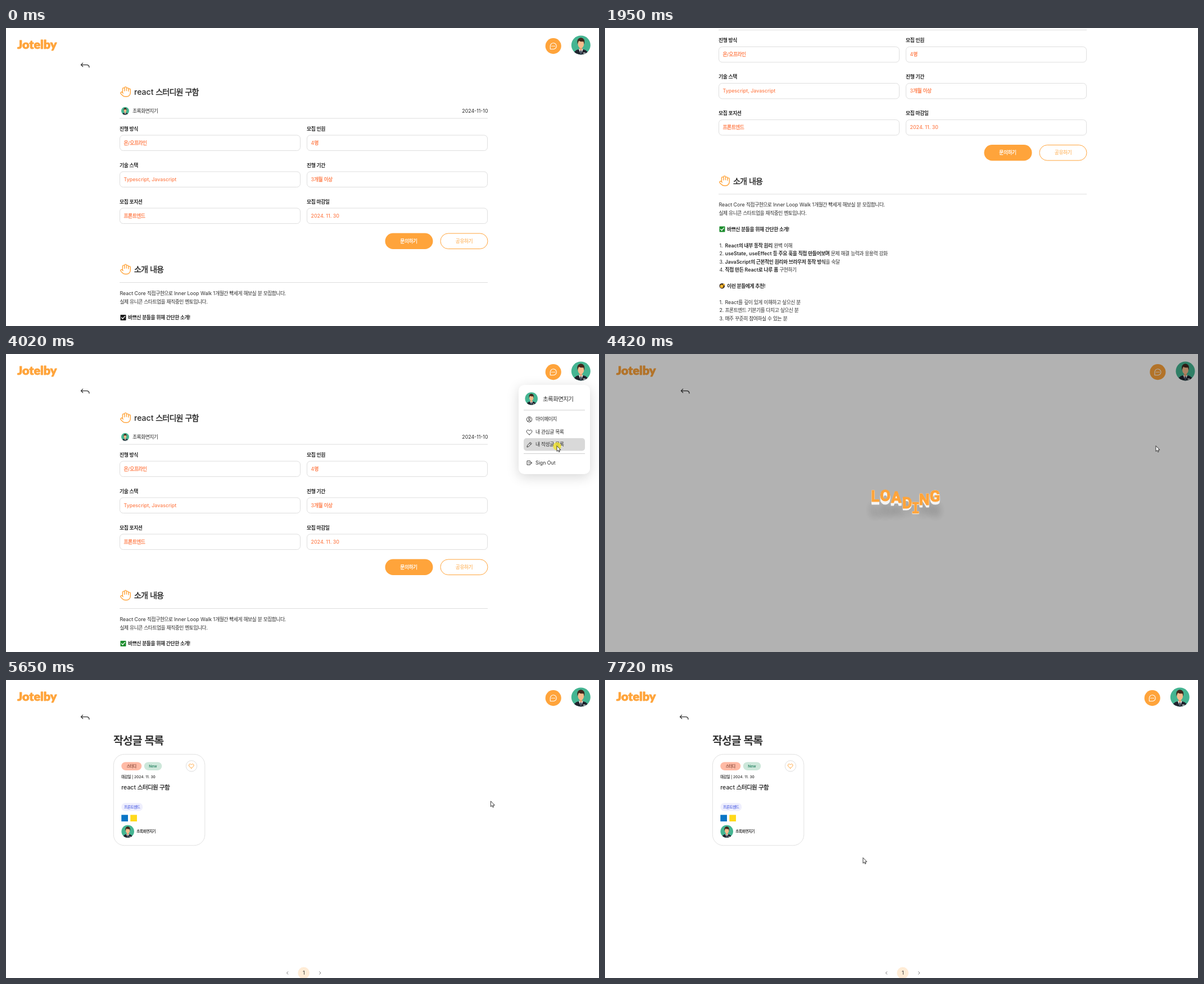
These frames come from a looping animation (1055 px wide and 531 px high, 7.98 s). An HTML page with a canvas:

```html
<!DOCTYPE html>
<html lang="ko">
<head>
<meta charset="utf-8">
<title>Study board</title>
<style>
html, body { margin: 0; width: 100%; height: 100%; overflow: hidden; background: #fff; }
canvas { display: block; width: 1055px; height: 531px; }
</style>
</head>
<body>
<canvas id="stage"></canvas>
<script>
const W = 1055, H = 531, LOOP = 7980;
const canvas = document.getElementById('stage');
const c = canvas.getContext('2d');
const dpr = window.devicePixelRatio || 1;
canvas.width = W * dpr;
canvas.height = H * dpr;

const FONT = 'Inter, "Noto Sans CJK KR", "Noto Sans CJK", sans-serif';
const ORANGE = '#ffa43b', CORAL = '#ff7f4d', INK = '#2b2b2b', LINE = '#dedede';
const NICK = '초록화면지기';

// Screen updates: start, end, number of steps
const BURSTS = [
  [870, 1290, 7], [1950, 2300, 6], [2630, 3120, 8], [3320, 3740, 7], [3940, 4700, 12],
  [4760, 5450, 11], [5650, 6420, 12], [6490, 7230, 12], [7300, 7720, 7]
];
// Pointer moves: start, end, points
const MOVES = [
  [2560, 2840, [[1044, 100], [1030, 55], [1020, 20]]],
  [3250, 3740, [[1020, 20], [1006, 70], [986, 125], [980, 164]]],
  [5580, 6420, [[980, 164], [640, 300], [300, 334], [140, 240], [200, 125], [290, 114]]],
  [6420, 7230, [[290, 114], [375, 150], [387, 240], [300, 310], [175, 230], [230, 112], [363, 124]]],
  [7230, 7720, [[363, 124], [400, 200], [440, 280], [459, 317]]]
];
const MENU_ON = 2980, LOAD_ON = 4140, LIST_ON = 5445;
const SCROLL = 190, STICKY = 83.2;

const clamp = v => Math.min(1, Math.max(0, v));
const span = (t, a, b) => clamp((t - a) / (b - a));

function snap(t) {
  let q = 0;
  for (const [a, b, n] of BURSTS) {
    if (t < a) break;
    const step = (b - a) / (n - 1);
    q = Math.min(b, a + Math.floor((t - a + 5) / step) * step);
  }
  return q;
}

function scrollAt(t) {
  if (t < 1900) return SCROLL * (1 - Math.pow(1 - span(t, 800, 1290), 1.21));
  return SCROLL * Math.pow(1 - span(t, 1880, 2300), 1.03);
}

function spline(pts, p) {
  const n = pts.length - 1, i = Math.min(n - 1, Math.floor(p * n)), u = p * n - i;
  const at = k => pts[Math.min(n, Math.max(0, k))];
  return [0, 1].map(d => {
    const a = at(i - 1)[d], b = at(i)[d], e = at(i + 1)[d], f = at(i + 2)[d];
    return b + u / 2 * (e - a + u * (2 * a - 5 * b + 4 * e - f + u * (3 * (b - e) + f - a)));
  });
}

function pointerAt(t) {
  const m = MOVES.filter(v => v[0] < t).pop();
  return spline(m[2], span(t, m[0], m[1]));
}

// CSS "ease" timing curve
function ease(x) {
  const bez = (s, a, b) => 3 * (1 - s) * (1 - s) * s * a + 3 * (1 - s) * s * s * b + s * s * s;
  let lo = 0, hi = 1;
  for (let i = 0; i < 16; i++) {
    const m = (lo + hi) / 2;
    if (bez(m, .25, .25) < x) lo = m; else hi = m;
  }
  return bez(lo, .1, 1);
}

// Draws a line centred on y and returns its end x.
// Hangul is set tighter, and its medium weight is made with a thin outline.
function text(s, x, y, size = 8.8, weight = 400, color = INK, align = 'left') {
  c.font = `${weight} ${size}px ${FONT}`;
  c.fillStyle = c.strokeStyle = color;
  c.lineWidth = size * .03;
  const runs = s.split(/([가-힣]+)/).filter(Boolean).map(word => {
    const hangul = /[가-힣]/.test(word);
    const gap = hangul ? (weight > 500 ? -.05 : -.06) * size + 'px' : '0px';
    c.letterSpacing = gap;
    return { word, hangul, gap, width: c.measureText(word).width };
  });
  const total = runs.reduce((w, r) => w + r.width, 0);
  if (align === 'center') x -= total / 2;
  if (align === 'right') x -= total;
  for (const r of runs) {
    c.letterSpacing = r.gap;
    c.fillText(r.word, x, y + size * .37);
    if (r.hangul && weight === 500) c.strokeText(r.word, x, y + size * .37);
    x += r.width;
  }
  c.letterSpacing = '0px';
  return x;
}

function box(x, y, w, h, r, fill, stroke) {
  c.beginPath();
  c.roundRect(x, y, w, h, r);
  if (fill) { c.fillStyle = fill; c.fill(); }
  if (stroke) { c.strokeStyle = stroke; c.lineWidth = 1; c.stroke(); }
}

function disc(x, y, r, fill, stroke, lw = 1) {
  c.beginPath();
  c.arc(x, y, r, 0, 7);
  if (fill) { c.fillStyle = fill; c.fill(); }
  if (stroke) { c.strokeStyle = stroke; c.lineWidth = lw; c.stroke(); }
}

function icon(d, x, y, scale, color, lw, fill) {
  c.save();
  c.translate(x, y);
  c.scale(scale, scale);
  c.lineWidth = lw / scale;
  c.lineCap = c.lineJoin = 'round';
  const p = new Path2D(d);
  if (fill) { c.fillStyle = fill; c.fill(p); }
  if (color) { c.strokeStyle = color; c.stroke(p); }
  c.restore();
}

const rule = (x, y, w, color = LINE) => { c.fillStyle = color; c.fillRect(x, y, w, 1); };

const HAND = 'M18 11V6a2 2 0 0 0-4 0M14 10V4a2 2 0 0 0-4 0v2M10 10.5V6a2 2 0 0 0-4 0v8' +
  'M18 8a2 2 0 1 1 4 0v6a8 8 0 0 1-8 8h-2c-2.8 0-4.5-.86-6-2.34l-3.6-3.6a2 2 0 0 1 2.83-2.82L7 15';
const HEART = 'M0 4.2C-3 2-4.8.4-4.8-1.6C-4.8-4.6-1.2-5 0-2.6C1.2-5 4.8-4.6 4.8-1.6C4.8.4 3 2 0 4.2Z';
const POINTER = 'M0 0V10L2.3 7.9L3.9 11.3L5.5 10.6L4 7.3H7Z';

function avatar(x, y, r) {
  const shape = (d, color) => icon(d, 0, 0, 1, null, 1, color);
  c.save();
  disc(x, y, r, '#45b592');
  c.clip();
  c.translate(x, y);
  c.scale(r / 17, r / 17);
  shape('M-13.5 18Q-13 9.5-4 7.5H4Q13 9.5 13.5 18Z', '#20242e');
  shape('M-4 7L0 17L4 7Z', '#f4f4f4');
  shape('M-1.3 9.5H1.3L1.6 17H-1.6Z', '#3c4a5a');
  shape('M-2.4 3H2.4V7.5L0 10L-2.4 7.5Z', '#e5a273');
  c.fillStyle = '#f8bb8c';
  c.beginPath();
  c.ellipse(0, -1.8, 5.4, 7.4, 0, 0, 7);
  c.fill();
  shape('M-6.2-1Q-8-12.5 0-13.2Q8-12.5 6.2-1Q5.2-4 4.6-6.5Q0-5.2-3.6-7.6Q-5-5-6.2-1Z', '#40271c');
  c.fillStyle = '#fff';
  c.fillRect(4, 13.5, 4, 1.3);
  c.restore();
}

function header(up, dx = 0) {
  c.save();
  c.translate(0, -up);
  c.font = '900 21.5px Lato, sans-serif';
  c.fillStyle = c.strokeStyle = ORANGE;
  c.lineWidth = .8;
  c.lineJoin = 'round';
  c.fillText('Jotelby', 20, 37);
  c.strokeText('Jotelby', 20, 37);
  const x = 973.7 + dx;
  disc(x, 32.1, 14.1, ORANGE);
  icon('M-5.4 5.4V0A5.5 5.5 0 1 1 0 5.5Z', x, 32.2, 1, '#fff', 1.1);
  for (const d of [-2.5, 0, 2.5]) disc(x + d, 32.4, .8, '#fff');
  avatar(1022.8 + dx, 30.4, 17);
  icon('M3.5-3.2L.2 0L3.5 3.2M.2 0H10Q14.8 0 14.8 4.5', 133.2 + dx * .2, 65.6, 1, '#333', 1.3);
  c.restore();
}

function field(label, value, x, y) {
  text(label, x, y - 11, 8.8, 600);
  box(x + .5, y + .5, 321, 27.5, 6, '#fff', LINE);
  text(value, x + 7.5, y + 14, 8.8, 500, CORAL);
}

function section(title, y) {
  icon(HAND, 202.2, y - 10.6, .87, ORANGE, 1.4);
  text(title, 228, y, 14.08, 500);
}

function post(scroll, tick) {
  c.save();
  c.translate(0, -scroll);
  section('react 스터디원 구함', 113.7);
  avatar(212, 147.8, 7);
  text(NICK, 225, 147.5);
  text('2024-11-10', 857.5, 147.5, 8.8, 400, INK, 'right');
  rule(202, 160.5, 655);
  field('진행 방식', '온/오프라인', 202, 190.5);
  field('모집 인원', '4명', 535, 190.5);
  field('기술 스택', 'Typescript, Javascript', 202, 255.5);
  field('진행 기간', '3개월 이상', 535, 255.5);
  field('모집 포지션', '프론트엔드', 202, 320.5);
  field('모집 마감일', '2024. 11. 30', 535, 320.5);
  box(674.5, 365.5, 85, 28.5, 14.2, ORANGE);
  text('문의하기', 716.5, 379.5, 8.8, 500, '#fff', 'center');
  box(773, 366, 84, 27.5, 13.7, '#fff', ORANGE);
  text('공유하기', 815, 379.5, 8.8, 400, ORANGE, 'center');
  section('소개 내용', 430);
  rule(202, 453, 655);
  text('React Core 직접구현으로 Inner Loop Walk 1개월간 빡세게 해보실 분 모집합니다.', 202.5, 472.7);
  text('실제 유니콘 스타트업을 재직중인 멘토입니다.', 202.5, 487.3);

  box(203.5, 511, 10, 10, .8, tick);
  icon('M-2.8 0L-.8 2.2L3-2.4', 208.5, 516, 1, '#fff', 1.3);
  text('바쁘신 분들을 위해 간단한 소개!', 217, 516.2, 8.8, 600);
  [
    ['React의 내부 동작 원리', ' 완벽 이해'],
    ['useState, useEffect 등 주요 훅을 직접 만들어보며', ' 문제 해결 능력과 응용력 강화'],
    ['JavaScript의 근본적인 원리와 브라우저 동작 방식', '을 숙달'],
    ['직접 만든 React로 나루 폼', ' 구현하기']
  ].forEach(([bold, rest], i) => {
    const y = 544.9 + i * 14.5;
    text(i + 1 + '.', 203.5, y);
    text(rest, text(bold, 213.5, y, 8.8, 600), y);
  });

  disc(208.3, 617.2, 4.8, '#3a2a20');
  disc(207.6, 617.6, 2.9, '#f7b52c');
  disc(211.6, 614.6, 1.6, '#f7b52c');
  text('이런 분들에게 추천!', 217, 617, 8.8, 600);
  [
    'React를 깊이 있게 이해하고 싶으신 분',
    '프론트엔드 기본기를 다지고 싶으신 분',
    '매주 꾸준히 참여하실 수 있는 분'
  ].forEach((s, i) => {
    const y = 646 + i * 14.5;
    text(i + 1 + '.', 203.5, y);
    text(s, 213.5, y);
  });
  c.restore();
}

function menu(y) {
  c.save();
  c.shadowColor = 'rgba(0,0,0,.16)';
  c.shadowBlur = 22;
  c.shadowOffsetY = 5;
  box(912, 55, 127, 159, 10, '#fff');
  c.restore();
  avatar(934.7, 79.5, 11.3);
  text(NICK, 955, 79.7, 10.56);
  rule(921, 99.5, 109, '#cfcfcf');
  rule(921, 177, 109, '#cfcfcf');
  const row = Math.floor((y - 105) / 22.5);
  if (row >= 0 && row < 3) box(921, 105 + row * 22.5, 109, 22.5, 5, '#d9d9d9');
  ['마이페이지', '내 관심글 목록', '내 작성글 목록'].forEach((s, i) => text(s, 942, 116 + i * 22.5));
  text('Sign Out', 942, 193.5);
  disc(931, 116.5, 4.7, null, INK, .9);
  disc(931, 115.2, 1.7, null, INK, .9);
  icon('M-3 3.3Q0 0 3 3.3', 931, 116.5, 1, INK, .9);
  icon(HEART, 931, 139.5, 1, INK, .9);
  icon('M-4 4L-3.4 1.2L2-4.2L4.2-2L-1.2 3.4ZM.6-2.8L2.8-.6', 931, 161.5, 1, INK, .9);
  icon('M1.5-2V-3.5H-4V3.5H1.5V2M-1.8 0H4.5M2.8-1.8L4.5 0L2.8 1.8', 931, 194, 1, INK, .9);
}

function loading(t) {
  header(0, 9.7);
  c.fillStyle = 'rgba(0,0,0,.302)';
  c.fillRect(0, 0, W, H);
  const xs = [480.5, 498.5, 518, 537.5, 552.5, 568, 587];
  const phase = .453 + (t - 5381) / 300;
  c.textAlign = 'center';
  c.lineJoin = 'round';
  const letters = [...'LOADING'].map((ch, i) => {
    const u = (((phase - i / 3) % 2) + 2) % 2;
    const up = ease(u > 1 ? 2 - u : u);
    return { ch, up, x: xs[i], y: 285 - 23 * up };
  });
  const glyph = (l, dy, color) => {
    c.font = l.ch === 'I' ? '700 26px "DejaVu Sans Mono", monospace' : '700 27px Roboto, sans-serif';
    c.fillStyle = c.strokeStyle = color;
    c.lineWidth = l.ch === 'I' ? .6 : 1.2;
    c.fillText(l.ch, l.x, l.y + dy);
    c.strokeText(l.ch, l.x, l.y + dy);
  };
  // Only the soft shadow of each letter lands on the stage
  for (const l of letters) {
    c.save();
    c.shadowColor = `rgba(0,0,0,${.17 * l.up})`;
    c.shadowBlur = 12;
    c.shadowOffsetY = (26 * l.up + 1000) * dpr;
    glyph(l, -1000, '#000');
    c.restore();
  }
  for (const l of letters) {
    for (let d = 1 + 4.5 * l.up; d > 0; d--) glyph(l, d, '#f4f4f4');
    glyph(l, 0, ORANGE);
  }
  c.textAlign = 'left';
}

function list() {
  header(0);
  text('작성글 목록', 191, 107.8, 19.36, 600, '#333');
  box(191.4, 132.4, 162.4, 162.4, 19, '#fff', '#e1e1e1');
  box(205.3, 146.2, 36, 14.8, 7.4, '#ffbaa5');
  text('스터디', 223.2, 153.6, 6.6, 500, '#84483a', 'center');
  box(245.8, 146.2, 31.5, 14.8, 7.4, '#cde7da');
  text('New', 261.3, 153.6, 6.6, 600, '#2f8768', 'center');
  disc(330, 153.3, 9.7, '#fff', LINE);
  icon(HEART, 329.8, 153.4, .9, ORANGE, 1);
  text('마감일 | 2024. 11. 30', 205.2, 172.6, 6.6, 500);
  text('react 스터디원 구함', 205.2, 191.5, 10.56, 500);
  box(205.3, 219, 38, 14.5, 7.2, '#efeffd');
  text('프론트엔드', 224.3, 226.2, 6.6, 500, '#5a6be6', 'center');
  box(205.3, 240.3, 11.7, 11.7, 0, '#0a75c6');
  box(221.3, 240.3, 11.7, 11.7, 0, '#ffd91c');
  avatar(216.7, 269.8, 11.3);
  text(NICK, 232.2, 269.5, 6.6, 500);
  disc(529.7, 522, 10.4, '#ffecd6');
  text('1', 529.7, 522, 8.8, 400, INK, 'center');
  icon('M1-2.3L-1.2 0L1 2.3', 500.7, 522, 1, '#777', 1);
  icon('M-1-2.3L1.2 0L-1 2.3', 558.7, 522, 1, '#777', 1);
}

function draw(t) {
  c.setTransform(dpr, 0, 0, dpr, 0, 0);
  c.fillStyle = '#fff';
  c.fillRect(0, 0, W, H);
  const [x, y] = t >= 2630 ? pointerAt(t) : [-50, -50];
  if (t >= LIST_ON) list();
  else if (t >= LOAD_ON) loading(t);
  else {
    const s = scrollAt(t);
    post(s, t < 870 ? '#1a1a1a' : t < 1950 ? '#0c651c' : '#1b8c2c');
    header(Math.max(0, s - STICKY));
    if (t >= MENU_ON) menu(y);
    if ((t >= 2900 && t < 3100) || t >= 3940) disc(x + .5, y + .5, 7.2, 'rgba(240,226,40,.8)');
  }
  icon(POINTER, x, y, .95, '#222', .9, '#fff');
}

let last = -1;
function loop(now) {
  const t = snap(now % LOOP);
  if (t !== last) draw(last = t);
  requestAnimationFrame(loop);
}
draw(0);
requestAnimationFrame(loop);
</script>
</body>
</html>
```
